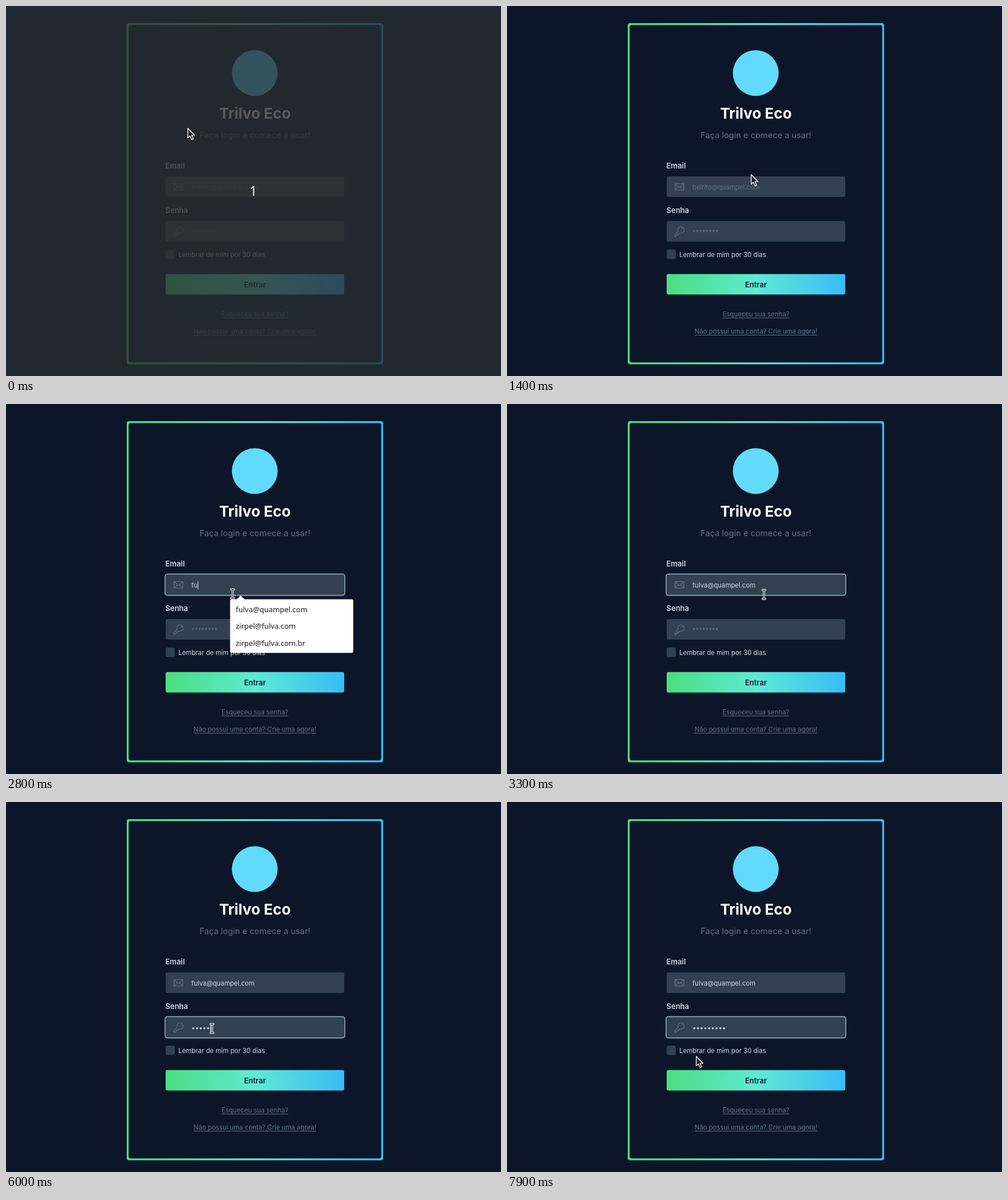
Recreate the animation shown at these times as an HTML page with a canvas. Size 865x647 px, loop 8 s.

```html
<!DOCTYPE html>
<html lang="pt-BR">
<head>
<meta charset="utf-8">
<title>Login</title>
<style>
  html, body { margin: 0; width: 100%; height: 100%; overflow: hidden; background: #0d1628; }
  canvas { display: block; }
</style>
</head>
<body>
<canvas id="stage" width="865" height="647"></canvas>
<script>
const ctx = document.getElementById('stage').getContext('2d');
const LOOP = 8000, STEP = 100;
const BG = '#0d1628', FIELD = '#324151', MUTED = '#607088', TEXT = '#cbd5e1', ACCENT = '#61dafb';
const UI = 'Inter, sans-serif', MENU = '"Noto Sans", sans-serif';
const SMALL = 11.375, BASE = 13, LEAD = 14.625, TITLE = 26;

// form column and its two inputs
const MID = 435, LEFT = 279, WIDTH = 312, ROW = 36;
const EMAIL_Y = 298, PASS_Y = 376;

const EMAIL = 'fulva@quampel.com';
const HINT = 'belrito@quampel.com';
const SAVED = ['marilvadour804@zelvu.com.br', 'delvia@ferlino.tech', 'delvia',
  'zirpel@fulva.com', 'zirpel@fulva.com.br', 're'];
const MATCHES = [EMAIL, 'zirpel@fulva.com', 'zirpel@fulva.com.br'];

const focusEmail = 1600, openMenu = 1800, typeEmail = 2700, pickEmail = 3100;
const focusPass = 4400, typePass = 5100, keyGap = 235, passLength = 9, blink = 600;

const HOME = { x: 317, y: 213 };
const MOVES = [
  { from: 400, to: 1600, x: 369, y: 319, bendX: 790, bendY: 140 },
  { from: 2600, to: 3100, x: 445, y: 357, bendX: 407, bendY: 338 },
  { from: 3100, to: 3300, x: 449, y: 333, bendX: 449, bendY: 345 },
  { from: 3300, to: 4200, x: 360, y: 396, bendX: 460, bendY: 355 },
  { from: 6800, to: 7800, x: 330, y: 444, bendX: 467, bendY: 416 }
];

const within = (t, a, b) => t >= a && t < b;
const clamp = (v, lo, hi) => Math.min(hi, Math.max(lo, v));
const smooth = k => k * k * (3 - 2 * k);
const curve = (a, b, c, k) => a * (1 - k) ** 2 + 2 * b * k * (1 - k) + c * k * k;

function pointerAt(t) {
  let { x, y } = HOME;
  for (const m of MOVES) {
    const k = smooth(clamp((t - m.from) / (m.to - m.from), 0, 1));
    x = curve(x, m.bendX, m.x, k);
    y = curve(y, m.bendY, m.y, k);
    if (k < 1) break;
  }
  return { x: Math.round(x), y: Math.round(y) };
}

function box(x, y, w, h, r, fill) {
  ctx.beginPath();
  ctx.roundRect(x, y, w, h, r);
  ctx.fillStyle = fill;
  ctx.fill();
}

function disc(x, y, r, fill) {
  box(x - r, y - r, 2 * r, 2 * r, r, fill);
}

function label(str, x, y, size, color, weight = 400, align = 'left', family = UI) {
  ctx.font = `${weight} ${size}px ${family}`;
  ctx.textAlign = align;
  ctx.fillStyle = color;
  ctx.fillText(str, x, y);
}

function trace(d, color, width) {
  ctx.strokeStyle = color;
  ctx.lineWidth = width;
  ctx.lineJoin = ctx.lineCap = 'round';
  ctx.stroke(new Path2D(d));
}

function sweep(x, w) {
  const g = ctx.createLinearGradient(x, 0, x + w, 0);
  ['#4ade80', '#5eead4', '#38bdf8'].forEach((c, i) => g.addColorStop(i / 2, c));
  return g;
}

function link(str, y) {
  label(str, MID, y, SMALL, MUTED, 400, 'center');
  const w = ctx.measureText(str).width;
  ctx.fillRect(MID - w / 2, y + 2, w, 1);
}

function field(y, focused) {
  box(LEFT, y, WIDTH, ROW, 3, FIELD);
  if (!focused) return;
  ctx.beginPath();
  ctx.roundRect(LEFT - 1, y - 0.6, WIDTH + 2, ROW + 1.2, 4);
  ctx.strokeStyle = '#94a3b8';
  ctx.lineWidth = 1.7;
  ctx.stroke();
}

function caret(x, y) {
  ctx.fillStyle = TEXT;
  ctx.fillRect(Math.round(x), y + 12, 1, 14);
}

function drawCard() {
  box(211, 30, 448, 596.6, 4, sweep(211, 448));
  box(214.3, 33.3, 441.4, 590, 4, BG);
  disc(434.7, 117.3, 40, ACCENT);
  label('Trilvo Eco', MID, 197, TITLE, '#fff', 700, 'center');
  label('Faça login e comece a usar!', MID, 230.5, LEAD, MUTED, 400, 'center');
  label('Email', LEFT - 0.5, EMAIL_Y - 14, BASE, TEXT, 600);
  label('Senha', LEFT - 0.5, PASS_Y - 14, BASE, TEXT, 600);
  box(LEFT, 426, 16, 16.5, 3, FIELD);
  label('Lembrar de mim por 30 dias', 301.3, 438.5, SMALL, TEXT);
  box(LEFT, 468.7, WIDTH, 35.7, 3, sweep(LEFT, WIDTH));
  label('Entrar', MID, 491.5, BASE, '#0f172a', 600, 'center');
  link('Esqueceu sua senha?', 543);
  link('Não possui uma conta? Crie uma agora!', 573);
}

function drawEmail(t) {
  field(EMAIL_Y, within(t, focusEmail, focusPass));
  trace('M293.7 310.5H309V322H293.7ZL301.4 317.4 309 310.5M293.9 321.8 299.7 316M308.8 321.8 303 316', MUTED, 1.2);
  const letters = t >= pickEmail ? EMAIL.length : clamp((t - typeEmail) / STEP + 1, 0, 2);
  const typed = EMAIL.slice(0, letters);
  label(typed || HINT, 324, EMAIL_Y + 23, SMALL, typed ? TEXT : MUTED);
  if (within(t, focusEmail, openMenu + blink) || within(t, typeEmail, pickEmail))
    caret(324 + (typed ? ctx.measureText(typed).width : 0), EMAIL_Y);
}

function drawPassword(t) {
  field(PASS_Y, t >= focusPass);
  trace('M299 394.2A5.6 5.6 0 1 1 302 397L300.4 398.6H298.2V400.8H296V402.6H293.3V399.9Z', MUTED, 1.2);
  disc(306, 390, 0.9, MUTED);
  const count = t < typePass ? 0 : clamp(Math.ceil((t - typePass + 108) / keyGap), 1, passLength);
  if (!count) label('*'.repeat(8), 324, PASS_Y + 23.5, SMALL, MUTED);
  for (let i = 0; i < count; i++) disc(327.2 + i * 6.5, 395.6, 1.9, TEXT);
  if (within(t, focusPass, focusPass + blink) || within(t, typePass, 7500))
    caret(324 + count * 6.5, PASS_Y);
}

function drawMenu(rows) {
  const pitch = 29.4;
  box(391.6, 341.5, 215.2, rows.length * pitch + 5.6, 3, '#fff');
  ctx.fill(new Path2D('M402.5 342 410 335 417.5 342Z'));
  rows.forEach((row, i) => label(row, 401.5, 364 + i * pitch, BASE, '#1c1c1c', 400, 'left', MENU));
}

function drawPointer({ x, y }) {
  const overField = [EMAIL_Y, PASS_Y].some(top =>
    within(x, LEFT, LEFT + WIDTH) && within(y, top, top + ROW));
  ctx.save();
  ctx.translate(x, y);
  if (overField) {
    const beam = 'M-2.5 -7.7H2.5M0 -7.7V7.7M-2.5 7.7H2.5';
    trace(beam, '#f4f4f4', 3.4);
    trace(beam, '#20242a', 1.2);
  } else {
    const arrow = 'M.7 .8V17.6L4.6 14.2 7.4 20.6 10.2 19.4 7.4 13.2 12.4 12.8Z';
    ctx.fillStyle = '#202124';
    ctx.fill(new Path2D(arrow));
    trace(arrow, '#fff', 1.3);
  }
  ctx.restore();
}

function drawCountdown() {
  ctx.fillStyle = 'rgba(40, 45, 49, 0.785)';
  ctx.fillRect(0, 0, 865, 647);
  label('1', 432, 332, 23, '#ececec', 400, 'center', MENU);
}

function draw(t) {
  ctx.fillStyle = BG;
  ctx.fillRect(0, 0, 865, 647);
  drawCard();
  drawEmail(t);
  drawPassword(t);
  if (within(t, openMenu, pickEmail)) drawMenu(t < typeEmail ? SAVED : MATCHES);
  if (t < STEP) drawCountdown();
  drawPointer(pointerAt(t));
}

const start = performance.now();
function tick() {
  const t = (performance.now() - start) % LOOP;
  draw(Math.floor(t / STEP) * STEP);
  requestAnimationFrame(tick);
}
tick();
</script>
</body>
</html>
```
